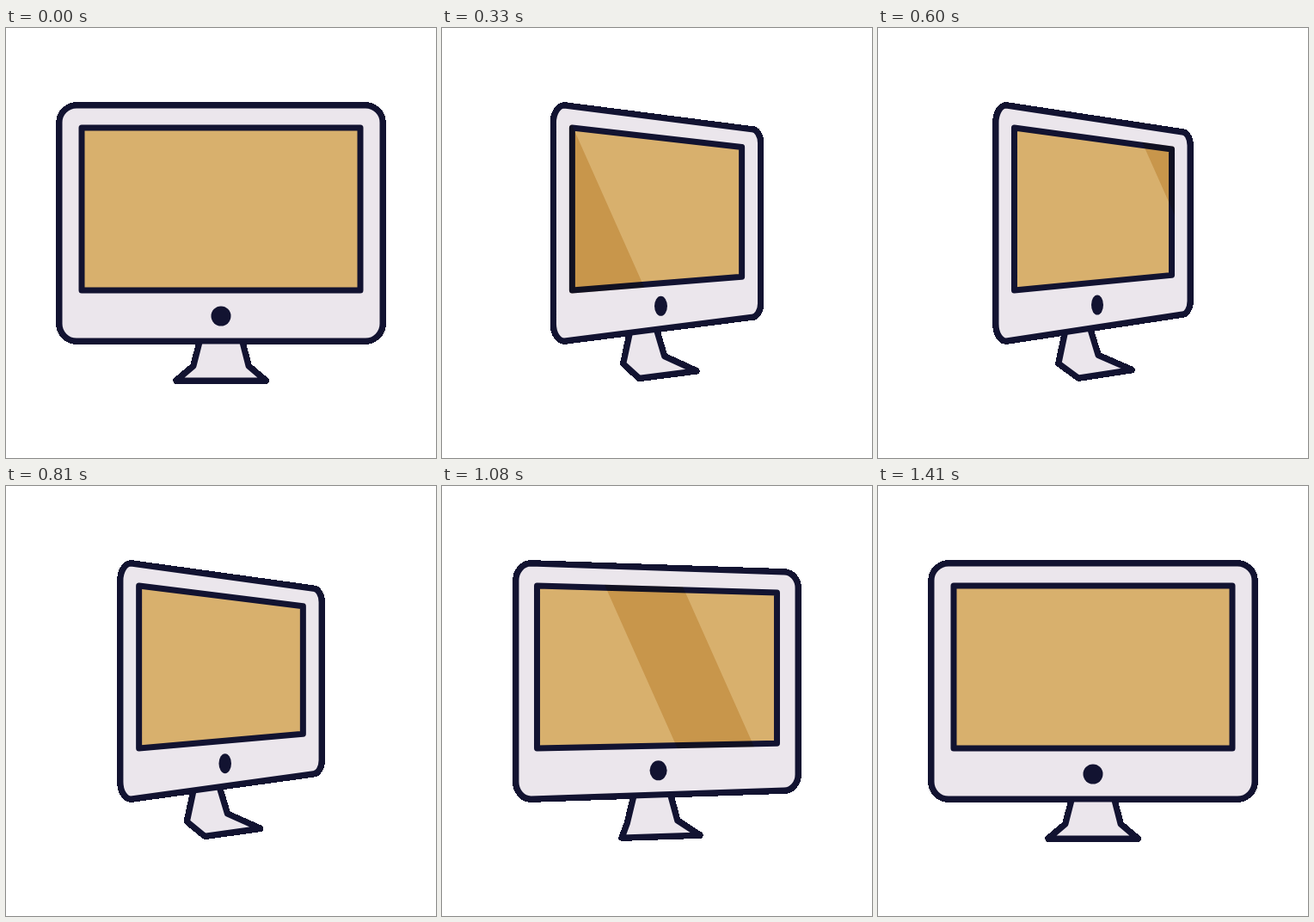
Animation, 500 px wide and 500 px high, one loop 1.65 s. Source, as an HTML page:

```html
<!DOCTYPE html>
<html lang="en">
<head>
<meta charset="utf-8">
<title>Turning monitor</title>
<style>
  html, body { margin: 0; width: 100%; height: 100%; overflow: hidden; background: #fff; }
  svg { display: block; width: 100%; height: 100%; }
  path { fill: #ebe6ec; stroke: #121331; stroke-width: 7; stroke-linejoin: round; }
  ellipse { fill: #121331; }
  #screen { fill: #d8b06d; }
  #shine { fill: #ecd9b0; stroke: none; mix-blend-mode: multiply; }
  #glass { mask-type: alpha; }
</style>
</head>
<body>
<svg viewBox="0 0 500 500">
  <!-- hard outer silhouette -->
  <filter id="crisp" color-interpolation-filters="sRGB">
    <feComponentTransfer><feFuncA type="discrete" tableValues="0 1 1 1 1 1 1 1"/></feComponentTransfer>
  </filter>
  <mask id="glass" maskUnits="userSpaceOnUse" x="0" y="0" width="500" height="500">
    <use href="#screen"/>
  </mask>
  <g filter="url(#crisp)">
    <path id="stand"/>
    <path id="body"/>
    <path id="screen"/>
    <g mask="url(#glass)" style="mix-blend-mode: multiply"><path id="shine"/></g>
    <ellipse id="button" ry="11.5"/>
  </g>
</svg>
<script>
const LOOP = 1650, END = 1410, STEP = 30, TURN = 600;
const SWEEPS = [22, 630], SWEEP_TIME = 842;
const MID = 250, HORIZON = 227, SHRINK = 0.226;

const BODY = { half: 188, top: 90, low: 364, r: 20, squeeze: 0.399 };
const SCREEN = { half: 162, top: 116, low: 305, r: 0, squeeze: 0.435 };
// Half width and height, then how far each side slides in the turn
const STAND = [
  { half: 21, y: 350, left: -10, right: -28 },
  { half: 32, y: 393, left: -8, right: -26 },
  { half: 52, y: 410, left: 35, right: -7 }
];

const $ = id => document.getElementById(id);
const clamp = u => Math.min(1, Math.max(0, u));
const smooth = u => u * u * (3 - 2 * u);

// cubic-bezier(1/3, 0, 0, 1)
function glide(u) {
  let lo = 0, hi = 1;
  for (let i = 0; i < 30; i++) {
    const s = (lo + hi) / 2;
    if (s * (1 - s) ** 2 + s ** 3 < u) lo = s; else hi = s;
  }
  return smooth((lo + hi) / 2);
}

// Rounded rectangle whose right side recedes towards the horizon
function slab({ half, top, low, r, squeeze }, p) {
  const narrow = 1 - squeeze * p, far = 1 - SHRINK * p;
  const L = MID - half * narrow, R = MID + half * narrow;
  const rx = r * narrow, fx = rx * far;
  const y = v => HORIZON + (v - HORIZON) * far;
  const near = `A${rx} ${r} 0 0 1`, away = `A${fx} ${r * far} 0 0 1`;
  return `M${L + rx} ${top}L${R - fx} ${y(top)}${away} ${R} ${y(top + r)}` +
    `V${y(low - r)}${away} ${R - fx} ${y(low)}` +
    `L${L + rx} ${low}${near} ${L} ${low - r}V${top + r}${near} ${L + rx} ${top}Z`;
}

function foot(p) {
  const left = STAND.map(s => [MID - s.half + s.left * p, s.y - 3 * p]);
  const right = STAND.map(s => [MID + s.half + s.right * p, s.y - 12.5 * p]);
  return `M${left.concat(right.reverse()).join('L')}Z`;
}

function band(t, start) {
  const x = 512 * smooth(clamp((t - start) / SWEEP_TIME)) - 6;
  return `M${x - 94} 100h90l98 220h-90Z`;
}

function draw(t) {
  const p = glide(clamp(1 - Math.abs(t - TURN) / TURN));
  $('stand').setAttribute('d', foot(p));
  $('body').setAttribute('d', slab(BODY, p));
  $('screen').setAttribute('d', slab(SCREEN, p));
  $('shine').setAttribute('d', SWEEPS.map(s => band(t, s)).join(''));
  $('button').setAttribute('cx', MID + 5 * p);
  $('button').setAttribute('cy', 335 - 13 * p);
  $('button').setAttribute('rx', 11.5 - 4.5 * p);
}

const began = performance.now();
function tick() {
  const t = (performance.now() - began) % LOOP;
  draw(t < END ? Math.floor(t / STEP) * STEP : LOOP);
  requestAnimationFrame(tick);
}
tick();
</script>
</body>
</html>
```
